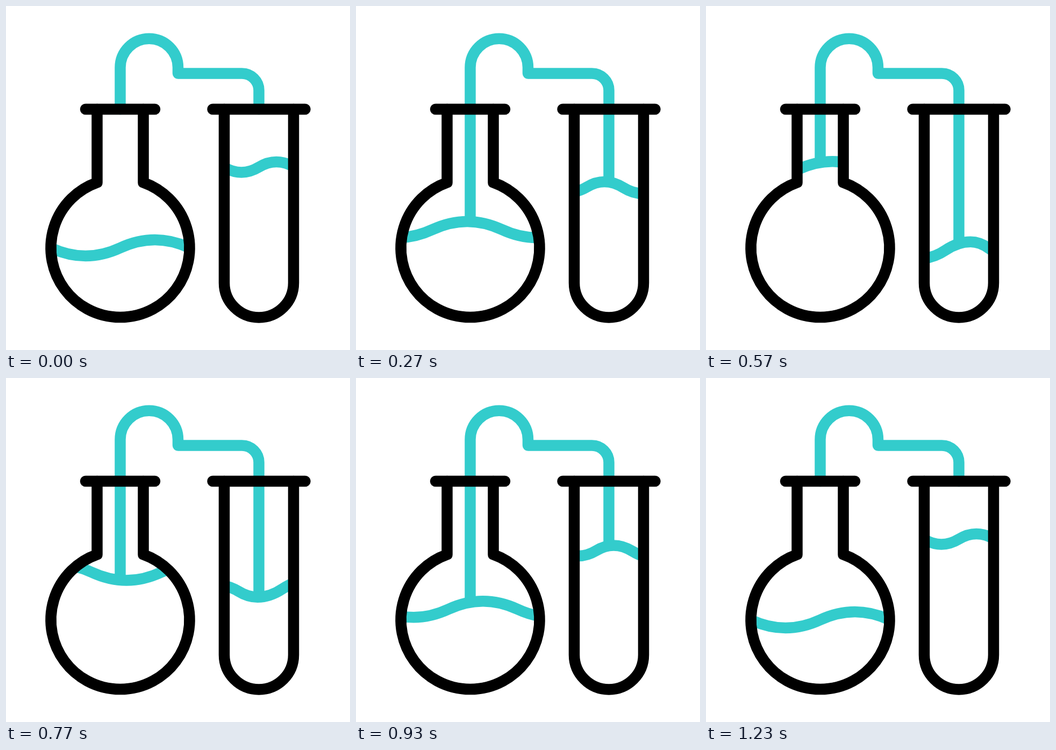
Write an HTML page with a canvas that moves like this. It is 640 px wide and 640 px high and loops after 1670 ms.

```html
<!DOCTYPE html>
<html lang="en">
<head>
<meta charset="utf-8">
<title>Distillation</title>
<style>
html, body { margin: 0; height: 100%; overflow: hidden; background: #fff; }
canvas { display: block; width: 640px; height: 640px; }
</style>
</head>
<body>
<canvas id="stage" width="640" height="640"></canvas>
<script>
const ctx = document.getElementById('stage').getContext('2d');
const LOOP = 1670, FRAME = 1000 / 30;
const TEAL = '#33cccc', BLACK = '#000';

const pipe = new Path2D('M212.5 192V114.5a53.75 53.75 0 0 1 107.5 0V125.5H439A31.5 31.5 0 0 1 470.5 157V192');

// crests: alternating extremes of the liquid surface at rest
const vessels = [
  {
    outline: new Path2D('M169.5 192V328.4A129 129 0 1 0 255.5 328.4V192'),
    lip: new Path2D('M148 192H277'),
    crests: [[19, 435], [148, 465], [277, 435], [406, 465], [535, 435], [664, 465]],
    streamX: 212.5, depth: 270, shift: [-300, -146]
  },
  {
    outline: new Path2D('M406 192V515a64.5 64.5 0 0 0 129 0V192'),
    lip: new Path2D('M384.5 192H556.5'),
    crests: [[373, 290], [438, 309.5], [503, 290], [574, 312], [667, 281], [735, 305]],
    streamX: 470.5, depth: 130, shift: [-175, 158]
  }
].map(v => ({ ...v, wave: wavePath(v.crests) }));

// Two parabolas meet halfway between neighbouring extremes
function wavePath(points) {
  let d = `M${points[0]}`;
  for (let i = 1; i < points.length; i++) {
    const [ax, ay] = points[i - 1], [bx, by] = points[i];
    const mx = (ax + bx) / 2, my = (ay + by) / 2;
    d += `Q${(ax + mx) / 2} ${ay} ${mx} ${my}Q${(mx + bx) / 2} ${by} ${bx} ${by}`;
  }
  const body = new Path2D(`${d}V900H${points[0][0]}Z`);
  return { line: new Path2D(d), body };
}

function ease(n, from, to) {
  const s = Math.min(1, Math.max(0, (n - from) / (to - from)));
  return s * s * (3 - 2 * s);
}

function stroke(path, color) {
  ctx.strokeStyle = color;
  ctx.stroke(path);
}

function drawLiquid(v, level, flow) {
  const [dx, dy] = v.shift;
  const tip = 180 + v.depth * flow + Math.max(0, dy) * level;
  ctx.save();
  ctx.clip(v.outline);
  stroke(new Path2D(`M${v.streamX} 170V${tip}`), TEAL);
  ctx.translate(dx * level, dy * level);
  ctx.fillStyle = '#fff';
  ctx.fill(v.wave.body);
  stroke(v.wave.line, TEAL);
  ctx.restore();
}

function draw(ms) {
  const n = Math.floor((ms % LOOP + 3.4) / FRAME);
  const level = n < 17 ? ease(n, 3.7, 17.4) : 1 - ease(n, 16.7, 31.4);
  const flow = ease(n, 0, 5) - ease(n, 32, 37);

  ctx.fillStyle = '#fff';
  ctx.fillRect(0, 0, 640, 640);
  ctx.lineWidth = 20.5;
  ctx.lineCap = ctx.lineJoin = 'round';
  for (const v of vessels) drawLiquid(v, level, flow);
  stroke(pipe, TEAL);
  for (const v of vessels) {
    stroke(v.outline, BLACK);
    stroke(v.lip, BLACK);
  }
}

const start = performance.now();
function tick() {
  draw(performance.now() - start);
  requestAnimationFrame(tick);
}
tick();
</script>
</body>
</html>
```
